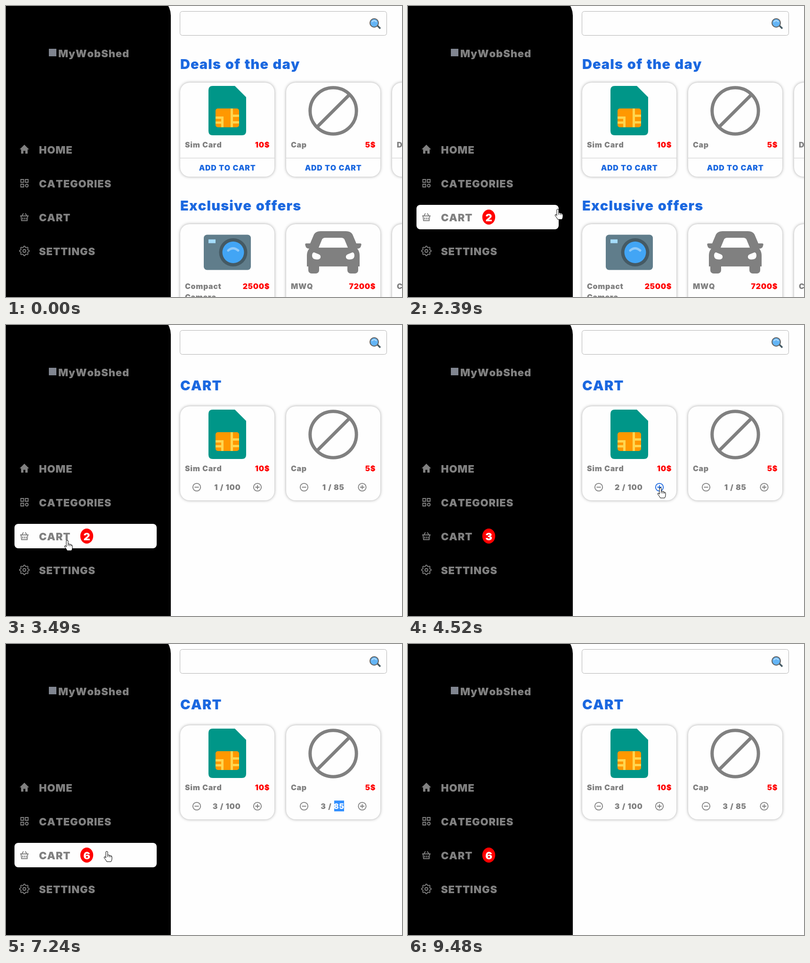
Recreate the animation shown at these times as an HTML page. Size 841 px wide and 619 px high, loop 9.75 s.

```html
<!DOCTYPE html>
<html lang="en">
<head>
<meta charset="utf-8">
<title>Shop demo</title>
<style>
  html, body { margin: 0; width: 100%; height: 100%; overflow: hidden; background: #fefefe; }
  svg { display: block; width: 841px; height: 619px; }
  text {
    font: 900 16px "Arial Black", Inter, "Liberation Sans", sans-serif;
    font-kerning: none; letter-spacing: .04em; word-spacing: .05em;
    fill: #808080; white-space: pre;
  }
  .menu { font-size: 22px; }
  .title { font-size: 29px; fill: #1b68e0; }
  .price { fill: red; text-anchor: end; }
  .mid { text-anchor: middle; }
  .end { text-anchor: end; }
  .blue { fill: #1b68e0; }
  .white { fill: #fff; }
  .card { fill: #fefefe; filter: drop-shadow(0 0 3px rgba(0, 0, 0, .35)); }
  .line { fill: none; stroke: #808080; stroke-width: 1.8; }
</style>
</head>
<body>
<svg id="stage" viewBox="0 0 841 619"></svg>
<script>
const LOOP = 9750, STEP = 70;
const stage = document.getElementById('stage');
const $ = id => document.getElementById(id);

const text = (x, y, s, cls = '', id = '') =>
  `<text x="${x}" y="${y}" class="${cls}" id="${id}">${s}</text>`;
const at = (x, y, body) => `<g transform="translate(${x} ${y})">${body}</g>`;

// Product pictures, each drawn in a 200 px wide card
const simCard = `
  <path fill="#009688" d="M69 7H116L140 31V103Q140 112 131 112H69Q60 112 60 103V16Q60 7 69 7Z"/>
  <rect x="75" y="55" width="50" height="40" rx="5" fill="#ff9800"/>
  <path fill="none" stroke="#ffd54f" stroke-width="5"
    d="M75 74.5H89.5V95M75 85H89M109.5 55V95M110 70.5H125M110 84.5H125"/>`;

const noImage = `
  <g fill="none" stroke="#808080" stroke-width="7">
    <circle cx="100" cy="60" r="49.2"/><path d="M135 25L65 95"/>
  </g>`;

const camera = `
  <rect x="50" y="22.5" width="100" height="75" rx="7" fill="#607d8b"/>
  <rect x="60" y="32.5" width="15" height="8" fill="#a5dcfb"/>
  <circle cx="112.5" cy="60" r="30" fill="#455a64"/>
  <circle cx="112.5" cy="60" r="23" fill="#42a5f5"/>
  <path d="M102 56Q112 47 123 56" fill="none" stroke="#90caf9" stroke-width="5" stroke-linecap="round"/>`;

const halfCar = `
  <path fill="#808080" d="M99 15H127Q137 15 141 22L149 41H157Q161 41 159 46Q158 52 151 52Q156 58 156 67V90H99Z"/>
  <rect x="130" y="70" width="23" height="35" rx="7" fill="#808080"/>
  <path fill="#fefefe" d="M99 29H117Q122 29 124 33L131 50H99Z"/>
  <path fill="#fefefe" d="M127 71Q126 66 131 64L141 60Q145 61 145 67Q145 74 137 75Q128 76 127 71Z"/>`;
const car = halfCar + `<g transform="matrix(-1 0 0 1 200 0)">${halfCar}</g>`;

const product = (x, y, picture, name, price, footer) => at(x, y, `
  <rect width="200" height="200" rx="20" class="card"/>
  ${picture}${text(10, 138, name)}${text(190, 138, price, 'price')}${footer}`);

const divider = '<path d="M0 160.5H200" stroke="#ccc"/>';
const buyFooter = id => `
  <path id="${id}" class="blue" d="M0 161H200V180Q200 200 180 200H20Q0 200 0 180Z"/>
  ${divider}${text(100, 187, 'ADD TO CART', 'mid blue', id + 'Label')}`;

const roundButton = (x, isPlus, id = '') => at(x, 172, `<g class="line" id="${id}">
  <circle r="8.2"/><path d="M-4.5 0h9${isPlus ? 'M0 -4.5v9' : ''}"/></g>`);

const countFooter = (minus, plus, end, id, extra = '') => `
  ${roundButton(minus, false)}${extra}${text(end, 178, '', 'end', id + 'Count')}
  ${roundButton(plus, true, id + 'Plus')}`;

const shopPage = `
  ${text(370, 134, 'Deals of the day', 'title')}
  ${product(370, 163, simCard, 'Sim Card', '10$', buyFooter('buySim'))}
  ${product(595, 163, noImage, 'Cap', '5$', buyFooter('buyCap'))}
  ${product(820, 163, '', 'Drone', '', divider)}
  ${text(370, 435, 'Exclusive offers', 'title')}
  ${product(370, 464, camera, 'Compact', '2500$', text(10, 161, 'Camera'))}
  ${product(595, 464, car, 'MWQ', '7200$', '')}
  ${product(820, 464, '', 'Chair', '', '')}`;

const selection = '<rect id="selection" x="102" y="160" width="21" height="23" fill="#3390ff"/>';
const cartPage = `
  ${text(370, 139, 'CART', 'title')}
  ${product(370, 173, simCard, 'Sim Card', '10$', countFooter(35, 164, 128.5, 'sim'))}
  ${product(595, 173, noImage, 'Cap', '5$', countFooter(38, 161.5, 123.5, 'cap', selection))}`;

function gearPath() {
  const points = Array.from({ length: 64 }, (_, i) => {
    const a = i * Math.PI / 32, r = 9 + 1.2 * Math.tanh(2.5 * Math.cos(8 * a));
    return `${(r * Math.cos(a)).toFixed(2)} ${(r * Math.sin(a)).toFixed(2)}`;
  });
  return `M${points.join('L')}Z`;
}

const icons = {
  HOME: '<path fill="#808080" d="M0 -10L10 0H7V9H2V3H-2V9H-7V0H-10Z"/>',
  CATEGORIES: `<path class="line" d="M-7.5 -8h6v6h-6zM2 -8h6v6h-6zM-7.5 2h6v6h-6z"/>
    <circle class="line" cx="5" cy="5" r="3"/>`,
  CART: `<path class="line" d="M-9 -2.5H9M-7 -2L-6 7.5H6L7 -2M-5 -3L-2 -8M5 -3L2 -8"/>
    <path class="line" d="M-3.6 1v4M0 1v4M3.6 1v4"/>`,
  SETTINGS: `<path class="line" d="${gearPath()}"/><circle class="line" r="3"/>`
};
const menu = Object.entries(icons).map(([label, icon], i) => at(0, 72 * i, `
  <rect id="row${i}" x="18" y="279" width="302" height="52" rx="8" fill="#fefefe"/>
  ${at(39, 305, icon)}${text(70, 314, label, 'menu')}`)).join('');

const cursors = `
  <g id="cursor" fill="#fff" stroke="#000" stroke-linejoin="round">
    <path id="arrow" d="M0 0V16L3.7 12.5L6.5 18.5L9 17.5L6.3 11.5H11Z"/>
    <path id="hand" d="M-2 14V2Q-2 0 0 0T2 2V8Q4 7 5.5 8.5Q7.5 8 8.5 9.5Q11 9.5 11 12V16Q11 19 9 22H0
      Q-2 18 -5.5 14Q-6 11 -3.5 11.5ZM2 8v4M5.5 8.5v4M8.5 9.5v3"/>
    <path id="beam" fill="none" d="M-3.5 -7.5H3.5M0 -7.5V7.5M-3.5 7.5H3.5"/>
  </g>`;

stage.innerHTML = `
  <rect width="841" height="619" fill="#fefefe"/>
  <rect x="369.5" y="11.5" width="439" height="51" rx="5" fill="#fefefe" stroke="#b5b5b5"/>
  <path d="M788 41L795 48" stroke="#455a64" stroke-width="3.5"/>
  <circle cx="782" cy="36" r="9" fill="#64b5f6" stroke="#616161" stroke-width="2"/>
  <path d="M777 34Q782 28 787 34" fill="none" stroke="#bbdefb" stroke-width="2"/>
  <g id="shop">${shopPage}</g><g id="cart">${cartPage}</g>
  <rect x="-60" y="-20" width="410" height="720" rx="40"/>
  <rect x="91" y="91" width="16" height="16" fill="#808590"/>
  ${text(111, 109, 'MyWobShed', 'menu')}
  ${menu}
  <g id="badge"><ellipse cx="171.5" cy="449" rx="13.7" ry="16" fill="red"/>
  ${text(172, 457.5, '', 'menu mid white', 'badgeCount')}</g>
  ${cursors}`;

// A pointer stroke begins at a time; its stops are [step, x, y]
const strokes = [];
const stroke = (start, ...stops) => strokes.push({ start, stops });
stroke(330, [0, 600, 563], [7, 690, 350], [10, 680, 345], [13, 655, 400]);
stroke(1310, [0, 650, 405], [3, 542, 408], [7, 460, 346]);
stroke(2060, [0, 460, 346], [6, 247, 475], [9, 162, 500], [10, 155, 472], [13, 145, 455]);
stroke(3090, [0, 143, 455], [1, 129, 452]);
stroke(3490, [0, 130, 458], [2, 140, 478], [10, 536, 346]);
stroke(4920, [0, 536, 346], [2, 545, 348], [10, 761, 346]);
stroke(6270, [0, 761, 346], [3, 757, 350], [4, 735, 382], [8, 330, 505], [10, 215, 505], [11, 192, 483], [13, 214, 441]);
stroke(7310, [0, 235, 448], [10, 640, 640]);
stroke(8940, [0, 800, 605], [4, 765, 405], [7, 802, 640]);

const clicks = { sim: [2060, 4390, 4920], cap: [890, 5870, 6270] };
const CART_OPENS = 3090, SELECTED = 6270, DESELECTED = 9220;

function pointerAt(t) {
  const current = strokes.filter(s => s.start <= t).pop();
  if (!current) return [-50, -50];
  const { start, stops } = current;
  const step = Math.floor((t - start) / STEP);
  const next = stops.findIndex(s => s[0] > step);
  if (next < 0) return stops[stops.length - 1].slice(1);
  const [s0, x0, y0] = stops[next - 1], [s1, x1, y1] = stops[next];
  const k = (step - s0) / (s1 - s0);
  return [x0 + (x1 - x0) * k, y0 + (y1 - y0) * k];
}

const show = (id, on) => $(id).setAttribute('display', on ? 'inline' : 'none');
const count = (name, t) => clicks[name].filter(c => c <= t).length;

function render(t) {
  const [x, y] = pointerAt(t);
  const inside = (x0, y0, x1, y1) => x >= x0 && x < x1 && y >= y0 && y < y1;
  const inCart = t >= CART_OPENS;
  let overLink = inside(18, 423, 320, 475);
  show('shop', !inCart);
  show('cart', inCart);

  for (let i = 0; i < 4; i++) {
    const over = inside(18, 279 + 72 * i, 320, 327 + 72 * i);
    show('row' + i, over);
    overLink ||= over;
  }
  for (const [id, left] of [['buySim', 370], ['buyCap', 595]]) {
    const over = !inCart && inside(left, 324, left + 200, 363);
    show(id, over);
    $(id + 'Label').style.fill = over ? '#fff' : '';
    overLink ||= over;
  }
  for (const [id, cx] of [['sim', 534], ['cap', 756.5]]) {
    const over = inCart && Math.hypot(x - cx, y - 345) < 9;
    $(id + 'Plus').style.stroke = over ? '#1b68e0' : '';
    overLink ||= over;
  }

  const sim = count('sim', t), cap = count('cap', t);
  const selected = t >= SELECTED && t < DESELECTED;
  show('badge', sim + cap > 0);
  $('badgeCount').textContent = sim + cap;
  $('simCount').textContent = `${sim} / 100`;
  $('capCount').innerHTML = `${cap} / <tspan fill="${selected ? '#fff' : '#808080'}">85</tspan>`;
  show('selection', selected);

  const overText = !inCart && inside(371, 405, 621, 442);
  $('cursor').setAttribute('transform', `translate(${x} ${y})`);
  show('hand', overLink);
  show('beam', overText);
  show('arrow', !overLink && !overText);
}

const begin = performance.now();
function tick() {
  render((performance.now() - begin) % LOOP);
  requestAnimationFrame(tick);
}
tick();
</script>
</body>
</html>
```
